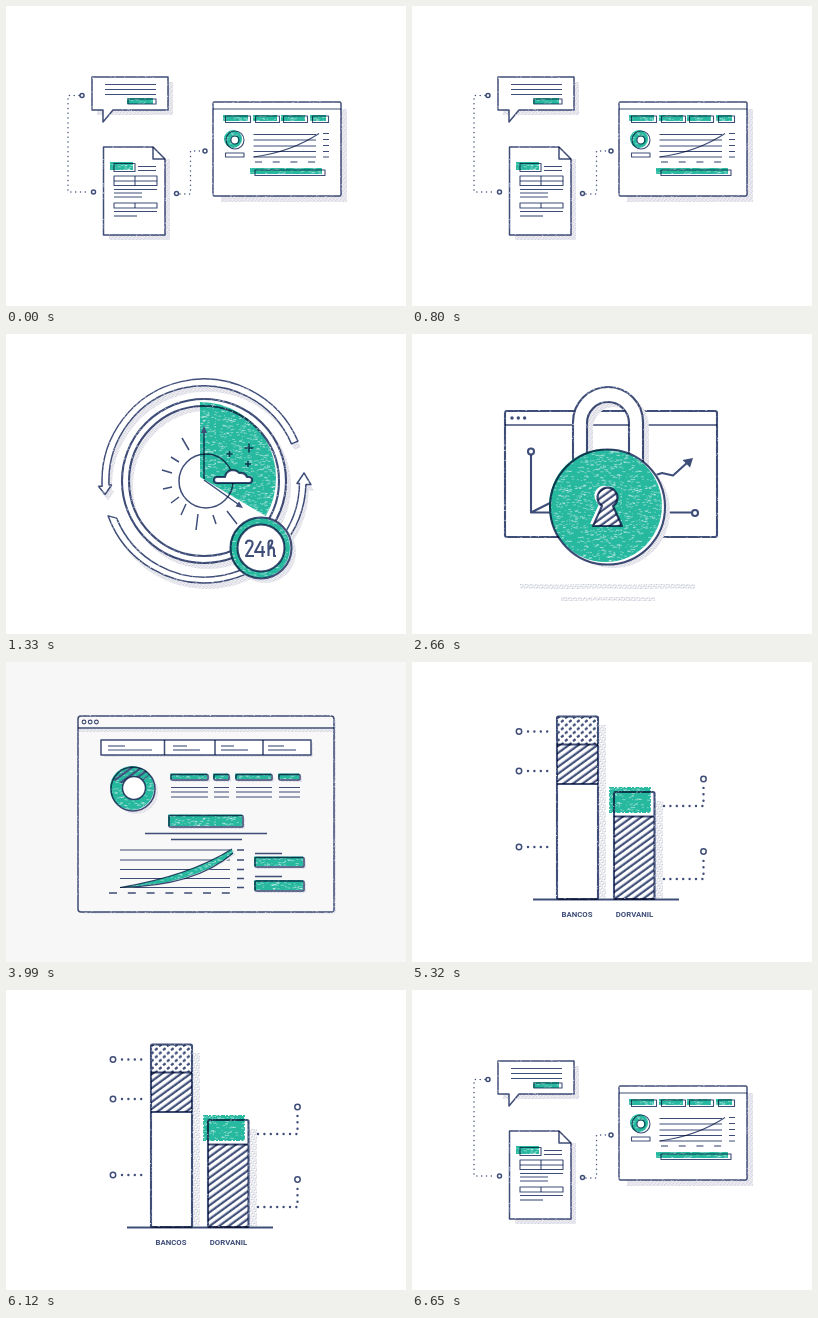
These frames come from a looping animation (400 px wide and 300 px high, 6.75 s). An HTML page:

```html
<!DOCTYPE html>
<html lang="pt">
<head>
<meta charset="utf-8">
<title>Illustrations</title>
<style>
html, body { margin: 0; width: 100%; height: 100%; overflow: hidden; background: #fff; }
svg { display: block; width: 100vw; height: 100vh; }
.ink, .bold, .thin, .wear, .dots { fill: none; stroke: #3f4e79; stroke-width: 1.5; stroke-linejoin: round; }
.ink, .bold, .thin { mix-blend-mode: multiply; }
.bold { stroke-width: 2.1; }
.thin { stroke-width: 1.1; }
.wear { stroke: url(#wear); stroke-width: 2.4; }
.dots { stroke-width: 1.5; stroke-linecap: round; stroke-dasharray: 0 4.8; }
.large .dots { stroke-width: 2.4; stroke-dasharray: 0 6.4; }
.teal { fill: #27b8a0; }
.rough { fill: none; stroke: #27b8a0; stroke-width: 1.8; stroke-dasharray: 4 1 2 1.5; }
.grain { fill: url(#grain); }
.paper { fill: #fff; }
.shade { fill: url(#shade); }
.shadeLine { fill: none; stroke: url(#shade); stroke-width: 8; }
.speck { fill: url(#speck); }
.hatch { fill: url(#hatch); }
.dash { fill: url(#dash); }
.solid { fill: #3f4e79; }
text { font: 700 7.8px Roboto, sans-serif; fill: #3f4e79; text-anchor: middle; }
</style>
</head>
<body>
<svg id="stage" viewBox="0 0 400 300"></svg>
<script>
// Each shape is drawn once per class in a space-separated list.
const layers = (names, tag, attrs) =>
  names.split(' ').map(c => `<${tag} class="${c}" ${attrs}/>`).join('');
const path = (c, d) => layers(c, 'path', `d="${d}"`);
const circle = (c, x, y, r) => layers(c, 'circle', `cx="${x}" cy="${y}" r="${r}"`);
const box = (c, x1, y1, x2, y2, r = 0) =>
  layers(c, 'rect', `x="${x1}" y="${y1}" width="${x2 - x1}" height="${y2 - y1}" rx="${r}"`);
const rows = (c, x1, x2, ...ys) => path(c, ys.map(y => `M${x1} ${y}H${x2}`).join(''));
const repeat = (n, fn) => Array.from({ length: n }, (_, i) => fn(i)).join('');
const label = (s, x, y) => `<text x="${x}" y="${y}">${s}</text>`;
const polar = (x, y, r, deg) => {
  const a = deg * Math.PI / 180;
  return `${(x + r * Math.cos(a)).toFixed(2)} ${(y + r * Math.sin(a)).toFixed(2)}`;
};
const arcTo = (x, y, r, deg, sweep) => `A${r} ${r} 0 0 ${sweep} ${polar(x, y, r, deg)}`;
const shift = (dx, dy, s) => `<g transform="translate(${dx} ${dy})">${s}</g>`;

let seed = 7;
const rand = (a, b) => {
  seed = (seed * 16807) % 2147483647;
  return a + (b - a) * seed / 2147483647;
};
const pattern = (id, w, h, body, extra = '') =>
  `<pattern id="${id}" width="${w}" height="${h}" patternUnits="userSpaceOnUse" ${extra}>${body}</pattern>`;
const flecks = (n, size, len, width) => `<path fill="none" stroke="#fff" stroke-width="${width}" stroke-opacity=".6" d="${
  repeat(n, () => `M${rand(0, size).toFixed(1)} ${rand(0, size).toFixed(1)}l${rand(.5, len).toFixed(1)} ${rand(-.8, .4).toFixed(1)}`)}"/>`;

const defs = `<defs>${
  pattern('grain', 70, 70, flecks(480, 70, 3.6, .7))}${
  pattern('wear', 60, 60, flecks(230, 60, 1.8, .9))}${
  pattern('shade', 3, 2, '<rect width="3" height="2" fill="#f1f1f5"/><path d="M0 .5H2.2" stroke="#c6c8d6" stroke-width=".8"/>', 'patternTransform="rotate(35)"')}${
  pattern('speck', 4, 3, '<path d="M0 .5h2.4M2 2h1.8" stroke="#bcc0cf" stroke-width=".9"/>', 'patternTransform="rotate(-35)"')}${
  pattern('hatch', 10, 5.6, '<path d="M0 2.6H10" stroke="#3f4e79" stroke-width="2.2"/>', 'patternTransform="rotate(-36)"')}${
  pattern('dash', 8, 7.6, '<path d="M1 3l2.6-1.8M5 6.8l2.6-1.8" stroke="#3f4e79" stroke-width="2.3"/>')
}</defs>`;

function workflow() {
  const bubble = 'M86 71H162V104H107L97 116V104H86Z';
  const sheet = 'M97.5 141H147L159 153V229H97.5Z';
  const tabs = [[217, 242], [247, 271], [275, 299], [304, 320]];
  return [
    path('dots', 'M73 89.5H62V186H84'),
    path('dots', 'M174 188H184.5V145H196'),
    [[76, 89.5], [87.5, 186], [170.5, 187.5], [199, 145]].map(p => circle('paper ink', ...p, 2)).join(''),

    shift(5, 5, path('shade', 'M86 71H162V104H86Z')),
    path('paper ink wear', bubble),
    rows('thin', 99, 150, 78.5, 83.5, 88.5),
    box('teal grain', 121, 92, 147, 98), box('thin', 122, 93, 150, 98),

    box('shade', 103, 153, 164, 234),
    path('paper ink wear', sheet),
    path('ink', 'M147 141V153H159'),
    box('teal grain', 104, 156, 127, 164), box('thin', 108, 157.5, 129, 165.5),
    rows('thin', 132, 150, 160.5, 164.5),
    box('thin', 108, 170, 151, 179.5), path('thin', 'M108 175H151M129 170V179.5'),
    rows('thin', 108, 151, 183.5), rows('thin', 108, 136, 187, 191),
    box('thin', 108, 197, 151, 202), path('thin', 'M129 197V202'),
    rows('thin', 108, 151, 205.5), rows('thin', 108, 131, 210),

    box('shade', 215, 103, 341, 196),
    box('paper ink wear', 207, 96, 335, 190, 1.5),
    rows('thin', 207, 335, 103),
    tabs.map(([a, b]) => box('teal grain', a, 109, b, 115) + box('thin', a + 2.5, 110, b + 2.5, 116.5)).join(''),
    circle('teal grain', 227, 133, 9), circle('paper', 228.5, 134, 3.5),
    circle('thin', 229, 134, 9), circle('thin', 229, 134, 4),
    box('thin', 219.5, 147, 238, 151),
    rows('thin', 247.5, 310, 128.5, 134, 140, 145.5, 151),
    path('thin', 'M247.5 151Q285 146 313 127.5'),
    rows('thin', 317, 323, 127.5, 133.5, 139.5, 145.5, 151),
    repeat(4, i => rows('thin', 249 + i * 17.7, 256 + i * 17.7, 156)),
    box('teal grain', 244, 162, 316, 168), box('thin', 249, 164, 319, 169.5)
  ].join('');
}

function clock() {
  const c = [198, 147];
  const upper = `M${polar(...c, 102, -23)}${arcTo(...c, 102, -183, 0)}H92.5L99 160.5L105.5 151H103${
    arcTo(...c, 95, -23, 1)}Z`;
  const lower = `M${polar(...c, 102, 160)}${arcTo(...c, 102, 2, 0)}H305L298 139L291 149.5H293.5${
    arcTo(...c, 95, 157, 1)}Z`;
  const plus = (x, y, r) => path('ink', `M${x - r} ${y}h${2 * r}M${x} ${y - r}v${2 * r}`);
  const cloud = 'M211 149H243Q246 149 246 146T243 143H241Q239 138 233 139Q231 136 226 136Q220 137 219 143H211Q208 143 208 146T211 149Z';
  return [
    shift(3, 6, path('shade', upper) + path('shade', lower)),
    path('paper ink wear', upper), path('paper ink wear', lower),
    circle('shadeLine', 202, 152, 79),
    `<circle cx="198" cy="147" r="78.5" fill="none" stroke="#fff" stroke-width="7"/>`,
    path('teal grain', `M194 143V68${arcTo(194, 144, 76, 30, 1)}Z`),
    circle('bold wear', ...c, 82), circle('bold wear', ...c, 75),
    circle('ink', 200, 147, 27),
    path('ink', 'M176 104L183 116M165 123L173 128M156 136L166 139M157 155L166 153M165 169L173 163M175 181L180 170M190 196L192 180M207 181L210 190M221 177L231 190'),
    path('ink', 'M198 145V96M198 146L234 171.5'),
    path('solid', 'M198 92L201 99H195Z'), path('solid', 'M237 174L229.5 172.5L233 167.5Z'),
    path('paper bold', cloud),
    plus(243, 114, 4.5), plus(223.5, 120, 3), plus(242, 130, 3),
    circle('shade', 259, 218, 31), circle('paper', 255, 214, 31),
    circle('teal grain', 254, 214, 30), circle('paper', 255, 214, 23.5),
    circle('bold', 255, 214, 30.5), circle('bold', 255, 214, 23.5),
    path('bold', 'M240 210Q240 206.5 243.5 206.5Q248 207 246 212L240 222H248M255 207L249 218H259M256.5 212V223M262.5 222V209Q263 206 265.5 206.5Q268 208 262.5 215.5Q268 211 268 217V222H270')
  ].join('');
}

function padlock() {
  const shackle = 'M161 135V88A35 35 0 0 1 231 88V135H217V89A21 21 0 0 0 175 89V135Z';
  const keyhole = 'M190 172A10 10 0 1 1 201 172L210 192H181Z';
  return [
    box('paper bold wear', 93, 77, 305, 203, 2),
    rows('ink', 93, 305, 91),
    repeat(3, i => circle('solid', 100 + i * 6.3, 84, 1.7)),
    path('bold', 'M119 121V178.5H279M119 178.5L140 168M244 141L250 139L261 141.5L276 128'),
    path('solid', 'M281 124L278 133.5L270.5 126Z'),
    circle('paper bold', 119, 117.5, 3), circle('paper bold', 283, 179, 3),
    shift(6, 5, path('shade', shackle)),
    path('paper bold wear', shackle),
    circle('shade', 201, 177, 57),
    circle('paper', 196, 173, 57),
    circle('teal grain', 193.5, 171.5, 56.5),
    circle('bold', 195.5, 173, 57.5),
    shift(-3, -2, path('paper', keyhole)),
    path('paper hatch bold', keyhole),
    box('speck', 108, 250, 283, 255), box('speck', 149, 263, 243, 267)
  ].join('');
}

function dashboard() {
  const nav = [[102, 119, 146], [167, 181, 194], [215, 228, 242], [262, 278, 290]];
  const tabs = [[165, 202], [208, 223], [230, 266], [273, 294]];
  const button = (x1, y1, x2, y2) =>
    box('shade', x1 + 2, y1 + 2, x2 + 2, y2 + 2) + box('teal grain', x1 - 1, y1 - 1, x2 - 1, y2 - 1) + box('ink', x1, y1, x2, y2, 1);
  const d = [127, 127];
  return [
    '<rect width="400" height="300" fill="#f7f7f7"/>',
    box('shade', 76, 58, 330, 251.5, 2),
    '<rect x="72" y="54" width="256" height="196" rx="3" fill="#f8f8f8"/>',
    box('ink wear', 72, 54, 328, 250, 3),
    rows('ink', 72, 328, 66), box('shade', 73, 67, 327, 70),
    repeat(3, i => circle('thin', 78 + i * 6.2, 60, 1.9)),
    box('shade', 98, 81, 307, 95), box('paper ink', 95, 78, 305, 93),
    path('ink', 'M158.5 78V93M209 78V93M257 78V93'),
    nav.map(([x, a, b]) => rows('thin', x, a, 84) + rows('thin', x, b, 88)).join(''),
    circle('shade', 130, 130, 22),
    circle('teal grain', 126, 126, 22),
    path('hatch', `M${polar(...d, 22, 205)}${arcTo(...d, 22, 320, 1)}L${polar(...d, 11, 320)}${arcTo(...d, 11, 205, 0)}Z`),
    circle('ink', ...d, 22), circle('paper ink', 128, 126, 11.5),
    tabs.map(([a, b]) => button(a, 112.5, b, 118) + rows('thin', a, b, 125.5, 130, 135)).join(''),
    button(163, 153.5, 237, 165),
    rows('ink', 139, 261, 171.5), rows('ink', 165, 236, 177.5),
    rows('thin', 114, 224, 188, 198, 207.5, 216.5, 225.5),
    path('shade', 'M116 226Q190 222 229 193L228 188Q180 216 116 226Z'),
    path('teal grain', 'M114 225.5Q183 214 226 187L227 192Q185 223 114 225.5Z'),
    path('thin', 'M114 225.5Q183 214 226 187M114 225.5Q190 224 227 191'),
    rows('ink', 231, 238, 188, 198, 207.5, 216.5, 225.5),
    repeat(7, i => rows('ink', 103 + i * 18.8, 111 + i * 18.8, 231)),
    rows('ink', 249, 276, 191.5), button(249, 195.5, 298, 205),
    rows('ink', 249, 276, 214.5), button(249, 219, 298, 229)
  ].join('');
}

function bars() {
  const marks = [[107, 69.5], [107, 109], [107, 185], [291.5, 117], [291.5, 189.5]];
  return `<g class="large">${[
    box('speck', 187, 63, 194, 236), box('speck', 243, 139, 251, 236),
    box('paper', 145, 54, 186, 237),
    box('dash', 146, 55, 185, 82), box('hatch', 145, 82, 186, 122),
    box('bold wear', 145, 54.5, 186, 237, 1.5),
    path('bold', 'M145 82.5H186M145 122H186'),
    box('paper', 202, 130, 242, 237),
    box('hatch', 202, 154, 242, 237),
    box('teal rough grain', 198, 126, 238, 150),
    box('bold wear', 202, 130, 242.5, 237, 1.5), rows('bold', 202, 242, 154.5),
    rows('bold', 121, 267, 237.5),
    marks.map(p => circle('paper ink', ...p, 2.7)).join(''),
    [69.5, 109, 185].map(y => rows('dots', 116, 137, y)).join(''),
    [144, 217].map(y => path('dots', `M252 ${y}H291.5V${y - 20}`)).join(''),
    label('BANCOS', 165, 255), label('DORVANIL', 222.5, 255)
  ].join('')}</g>`;
}

const stage = document.getElementById('stage');
stage.innerHTML = defs + [workflow, clock, padlock, dashboard, bars]
  .map(draw => `<g class="scene">${draw()}</g>`).join('');
const scenes = [...stage.querySelectorAll('.scene')];

const LOOP = 6750, HOLD = 1330;
function render(now) {
  const current = Math.floor((now % LOOP) / HOLD) % scenes.length;
  scenes.forEach((scene, i) => { scene.style.display = i === current ? '' : 'none'; });
}
function tick() {
  render(performance.now());
  requestAnimationFrame(tick);
}
tick();
</script>
</body>
</html>
```
